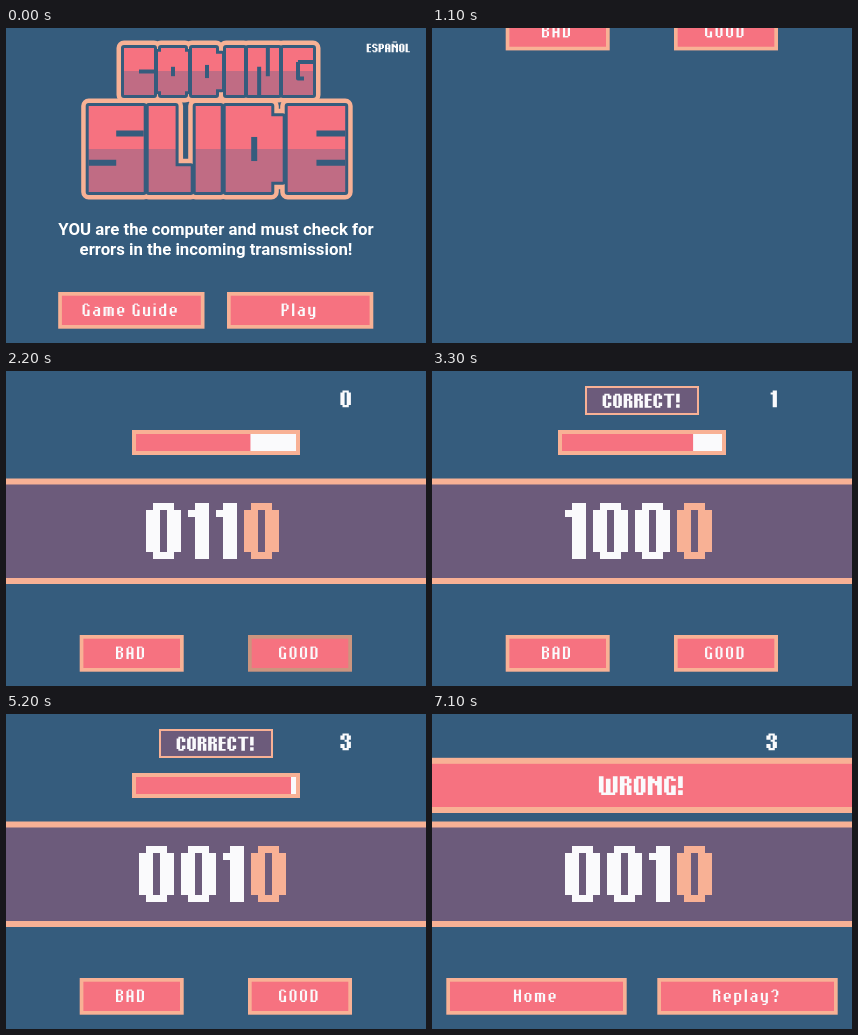
These frames come from a looping animation (420 px wide and 315 px high, 8.3 s). An HTML page:

```html
<!DOCTYPE html>
<html lang="en">
<head>
<meta charset="utf-8">
<title>Coding Slide</title>
<style>
  html, body { margin: 0; width: 100%; height: 100%; overflow: hidden; background: #355c7d; }
  svg { display: block; width: 100%; height: 100%; }
  .intro { font: 700 16.8px Roboto, sans-serif; fill: #fff; text-anchor: middle; }
</style>
</head>
<body>
<svg id="stage" viewBox="0 0 420 315">
  <defs id="defs">
    <linearGradient id="split" x1="0" y1="0" x2="0" y2="1">
      <stop offset=".5" stop-color="#f67280"/>
      <stop offset=".5" stop-color="#c06c84"/>
    </linearGradient>
  </defs>
</svg>
<script>
const BLUE = '#355c7d', PINK = '#f67280', PEACH = '#f8b195', PURPLE = '#6c5b7b';
const WHITE = '#fafafc', DIM = '#cb957f';
const LOOP = 8300, TICK = 100;

// Pixel lettering: outlines on a grid, capitals eight units tall
const ring = 'M1 0h3v1h1v6h-1v1h-3v-1h-1v-6h1zM2 1v6h1v-6z';
const en = 'M0 0h2v1h1v1h1v-2h2v8h-2v-4h-1v-1h-1v5h-2z';
const glyphs = {
  0: ring, O: ring,
  1: 'M1 0h2v8h-2v-6h-1v-1h1z',
  2: 'M1 0h3v1h1v3h-1v1h-1v1h-1v1h3v1h-5v-2h1v-1h1v-1h1v-3h-1v2h-2v-2h1z',
  3: 'M1 0h3v1h1v2h-1v1h1v3h-1v1h-3v-1h-1v-2h2v2h1v-3h-1v-1h1v-2h-1v2h-2v-2h1z',
  A: 'M1 0h3v1h1v7h-2v-3h-1v3h-2v-7h1zM2 1v3h1v-3z',
  B: 'M0 0h4v1h1v2h-1v1h1v3h-1v1h-4zM2 1v2h1v-2zM2 4v3h1v-3z',
  C: 'M1 0h3v1h1v2h-2v-2h-1v6h1v-2h2v2h-1v1h-3v-1h-1v-6h1z',
  D: 'M0 0h4v1h1v6h-1v1h-4zM2 1v6h1v-6z',
  E: 'M0 0h4v1h-2v2h2v1h-2v3h2v1h-4z',
  G: 'M1 0h3v1h1v1h-2v-1h-1v6h1v-3h2v4h-4v-1h-1v-6h1z',
  H: 'M0 0h2v3h1v-3h2v8h-2v-4h-1v4h-2z',
  L: 'M0 0h2v7h2v1h-4z',
  N: en, Ñ: en + 'M1 -2h4v1h-4z',
  P: 'M0 0h4v1h1v3h-1v1h-2v3h-2zM2 1v3h1v-3z',
  R: 'M0 0h4v1h1v2h-1v1h1v4h-2v-4h-1v4h-2zM2 1v2h1v-2z',
  S: 'M1 0h3v1h1v1h-2v-1h-1v2h2v1h1v3h-1v1h-3v-1h-1v-1h2v1h1v-3h-2v-1h-1v-2h1z',
  T: 'M0 0h6v1h-2v7h-2v-7h-2z',
  W: 'M0 0h2v7h1v-6h2v6h1v-7h2v7h-1v1h-6v-1h-1z',
  a: 'M1 2h3v1h1v5h-4v-1h-1v-2h1v-1h2v-1h-2zM2 5v2h1v-2z',
  d: 'M3 0h2v8h-4v-1h-1v-4h1v-1h2zM2 3v4h1v-4z',
  e: 'M1 2h3v1h1v3h-3v1h2v1h-3v-1h-1v-4h1zM2 3v2h1v-2z',
  i: 'M0 0h2v1h-2zM0 2h2v6h-2z',
  l: 'M0 0h2v8h-2z',
  m: 'M0 2h6v1h1v5h-2v-5h-.5v5h-2v-5h-.5v5h-2z',
  o: 'M1 2h3v1h1v4h-1v1h-3v-1h-1v-4h1zM2 3v4h1v-4z',
  p: 'M0 2h4v1h1v4h-1v1h-2v2h-2zM2 3v4h1v-4z',
  u: 'M0 2h2v5h1v-5h2v6h-4v-1h-1z',
  y: 'M0 2h2v5h1v-5h2v7h-1v1h-3v-1h2v-1h-2v-1h-1z',
  '!': 'M0 0h2v5h-2zM0 6h2v2h-2z',
  '?': 'M1 0h3v1h1v3h-1v1h-2v-1h1v-3h-1v1h-2v-1h1zM2 6h2v2h-2z'
};
const widths = { ' ': 1.5, '!': 2, i: 2, l: 2, 1: 3, E: 4, L: 4, T: 6, N: 6, Ñ: 6, m: 7, W: 8 };
const BOLD = { gap: 1, thin: 0 }, LIGHT = { gap: 1.55, thin: .6 };

function add(parent, tag, attrs = {}) {
  const el = document.createElementNS('http://www.w3.org/2000/svg', tag);
  for (const key in attrs) el.setAttribute(key, attrs[key]);
  return parent.appendChild(el);
}
const defs = document.getElementById('defs');
const group = parent => add(parent, 'g');
const rect = (parent, x, y, width, height, fill) =>
  add(parent, 'rect', { x, y, width, height, fill });
const show = (el, on) => el.setAttribute('display', on ? 'inline' : 'none');
const shift = (el, y) => el.setAttribute('transform', `translate(0 ${y})`);

// Narrows upright strokes by clipping a glyph with its own shifted outline
function thinClip(ch, thin) {
  const id = 'thin' + ch.codePointAt(0);
  if (!document.getElementById(id)) {
    add(add(defs, 'clipPath', { id }), 'path',
      { d: glyphs[ch], 'clip-rule': 'evenodd', transform: `translate(${-thin} 0)` });
  }
  return `url(#${id})`;
}

// align: 0 left, .5 centre, 1 right; each letter carries its trailing gap
function pixelText(parent, text, x, y, unit, { align = .5, last = WHITE, face = BOLD } = {}) {
  const advance = ch => (widths[ch] || 5) + face.gap;
  const total = [...text].reduce((sum, ch) => sum + advance(ch), 0);
  const word = add(parent, 'g', {
    role: 'img', 'aria-label': text, 'fill-rule': 'evenodd',
    transform: `translate(${x - total * unit * align} ${y}) scale(${unit})`
  });
  let pen = 0;
  [...text].forEach((ch, i) => {
    if (glyphs[ch]) {
      const letter = add(word, 'path', {
        d: glyphs[ch], transform: `translate(${pen} 0)`,
        fill: i === text.length - 1 ? last : WHITE
      });
      if (face.thin) letter.setAttribute('clip-path', thinClip(ch, face.thin));
    }
    pen += advance(ch);
  });
}

function button(parent, label, x, width) {
  const g = group(parent);
  const edge = rect(g, x, 264, width, 36.7, PEACH);
  rect(g, x + 3.7, 267.7, width - 7.4, 29.3, PINK);
  pixelText(g, label, x + width / 2, 275.2, 1.6, { face: LIGHT });
  return { hover: on => edge.setAttribute('fill', on ? DIM : PEACH) };
}

function stripe(parent, y, height, fill) {
  rect(parent, 0, y, 420, height, PEACH);
  rect(parent, 0, y + 6, 420, height - 12, fill);
}

// Title letters: body and dark cuts in a ten by ten box
const block = 'M0 0H10V10H0Z';
const blocks = {
  C: [block, 'M5 5H10'],
  O: ['M1 0H9V.8H10V9.2H9V10H1V9.2H0V.8H1Z', 'M5 4V6'],
  D: ['M0 0H8V1.2H10V8.8H8V10H0Z', 'M5 3.6V6.4'],
  I: [block, ''],
  N: [block, 'M3.6 4V10M6.4 0V6'],
  G: [block, 'M5 3H10M5 3V6.5H7'],
  S: [block, 'M5 3.2H10M0 6.6H5'],
  L: ['M0 0H6.4V7H10V10H0Z', ''],
  E: [block, 'M5 3.2H10M5 6.6H10']
};

function blockWord(parent, word, x, y, height, sizes, gap, cut) {
  const layers = [0, 1, 2].map(() => group(parent));
  [...word].forEach((ch, i) => {
    const [body, cuts] = blocks[ch];
    const base = {
      transform: `translate(${x} ${y}) scale(${sizes[i] / 10} ${height / 10})`,
      'vector-effect': 'non-scaling-stroke', 'stroke-linejoin': 'round'
    };
    const line = (layer, d, stroke, width, fill) => add(layers[layer], 'path',
      { ...base, d, stroke, 'stroke-width': width, fill });
    line(0, body, PEACH, 15, PEACH);
    line(1, body, BLUE, 6, BLUE);
    line(2, body, 'none', 0, 'url(#split)');
    if (cuts) line(2, cuts, BLUE, cut, 'none');
    x += sizes[i] + gap;
  });
}

const stage = document.getElementById('stage');
rect(stage, 0, 0, 420, 315, BLUE);

// Menu
const menu = group(stage);
const title = group(menu);
blockWord(title, 'CODING', 118, 20, 47, [30, 30, 30, 18, 31, 30], 4, 4);
blockWord(title, 'SLIDE', 82.7, 78, 86, [55, 42, 25, 57, 57.5], 5, 6);
const lower = group(menu);
pixelText(lower, 'ESPAÑOL', 360.7, 15.7, 1.08, { align: 0 });
['YOU are the computer and must check for', 'errors in the incoming transmission!']
  .forEach((text, i) => {
    add(lower, 'text', { class: 'intro', x: 210, y: 206.5 + i * 20 }).textContent = text;
  });
button(lower, 'Game Guide', 52.2, 146.3);
const play = button(lower, 'Play', 221, 146.3);

// Game
const game = group(stage);
stripe(game, 107.5, 105.5, PURPLE);
const timer = group(game);
rect(timer, 126, 59, 168, 25, PEACH);
rect(timer, 130, 63, 160, 17, WHITE);
const left = rect(timer, 130, 63, 160, 17, PINK);

const correct = group(game);
rect(correct, 153, 15, 114, 29, PEACH);
rect(correct, 155, 17, 110, 25, PURPLE);
pixelText(correct, 'CORRECT!', 210, 22.8, 1.75);

const wrong = group(game);
stripe(wrong, 43.8, 55.2, PINK);
pixelText(wrong, 'WRONG!', 210, 62.3, 2.33);

const rounds = [
  { start: 860, code: '0110' },
  { start: 2450, code: '1000' },
  { start: 3760, code: '1011' },
  { start: 5053, code: '0010' }
];
rounds.forEach((round, i) => {
  round.view = group(game);
  pixelText(round.view, round.code, 210, 132, 7, { last: PEACH });
  pixelText(round.view, String(i), 347, 19.4, 2.1, { align: 1 });
});

const answers = group(game);
const bad = button(answers, 'BAD', 73.7, 104);
const good = button(answers, 'GOOD', 242, 104);

const ending = group(game);
button(ending, 'Home', 14.3, 180.4);
button(ending, 'Replay?', 225.3, 180.4);

const progress = (t, start, length) => Math.min(1, Math.max(0, (t - start) / length));
const remain = p => (1 - p) ** 3;
const within = (t, from, to) => t >= from && t < to;

function draw(t) {
  const leave = progress(t, 746, 340);
  const away = 315 * leave ** 3;
  show(menu, leave < 1);
  shift(title, -away);
  shift(lower, away);
  play.hover(t >= 800);

  show(game, leave === 1);
  shift(game, -315 * remain(progress(t, 1086, 346)));

  const now = Math.max(0, rounds.findLastIndex(round => t >= round.start));
  rounds.forEach((round, i) => show(round.view, i === now));
  const age = Math.min(t, 6000) - rounds[now].start;
  left.setAttribute('width', 160 - Math.min(160, Math.max(0, age * .034)));

  show(correct, now > 0 && t - rounds[now].start < 940);
  const size = 1 - remain(progress(t, rounds[now].start, 120));
  correct.setAttribute('transform',
    `translate(210 29.5) scale(${size}) translate(-210 -29.5)`);

  const press = i => within(t, rounds[i].start - 250, rounds[i].start + 60);
  good.hover(press(1) || within(t, 5750, 6000));
  bad.hover(press(2) || press(3));
  show(answers, t < 6000);

  show(wrong, t >= 6150);
  shift(wrong, -99 * remain(progress(t, 6150, 150)));
  show(timer, t < 6300);
  show(ending, t >= 6950);
  shift(ending, 51 * remain(progress(t, 6950, 150)));
}

const begin = performance.now();
function frame() {
  const t = Math.max(0, performance.now() - begin) % LOOP;
  draw(Math.floor(t / TICK) * TICK);
  requestAnimationFrame(frame);
}
frame();
</script>
</body>
</html>
```
